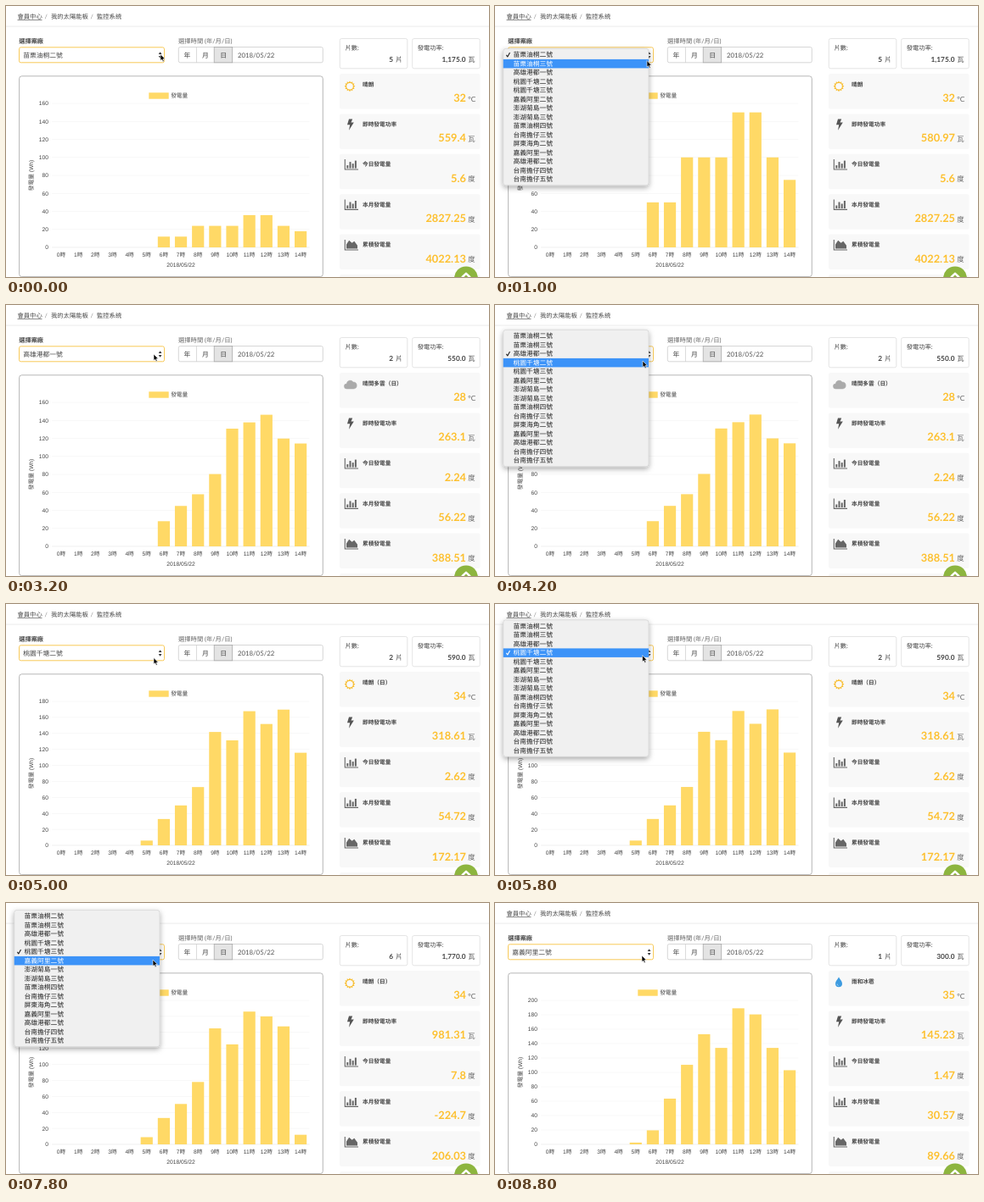
An HTML page for the animation above (9 s loop, 569 px wide and 320 px high).

```html
<!DOCTYPE html>
<html lang="zh-Hant">
<head>
<meta charset="utf-8">
<title>監控系統</title>
<style>
  html, body { margin: 0; width: 100%; height: 100%; overflow: hidden; background: #fff; }
  svg { display: block; width: 100%; height: 100%; text-rendering: geometricPrecision;
        font-family: Lato, "Noto Sans CJK TC", "Noto Sans CJK JP", sans-serif; }
  .axis { font-family: "Liberation Sans", "Noto Sans CJK TC", "Noto Sans CJK JP", sans-serif; }
</style>
</head>
<body>
<svg id="stage" viewBox="0 0 569 320"></svg>
<script>
const LOOP = 9000, STEP = 200, GROW = 500;
const INK = '#444', GOLD = '#fdc02f', BAR = '#ffd966';

const MENU = ['苗栗油桐二號', '苗栗油桐三號', '高雄港都一號', '桃園千塘二號', '桃園千塘三號',
  '嘉義阿里二號', '澎湖菊島一號', '澎湖菊島三號', '苗栗油桐四號', '台南擔仔三號',
  '屏東海角二號', '嘉義阿里一號', '高雄港都二號', '台南擔仔四號', '台南擔仔五號'];
// Rows as listed from the second popup on.
const ROWS = MENU;

// at: selection time, chart: start of bar growth, first: hour of the first bar
const SITES = [
  { at: 0, chart: -33, max: 160, first: 6, bars: [50, 50, 100, 100, 100, 150, 150, 100, 75],
    panels: '5', watts: '1,175.0', sky: '晴朗', icon: 'sun', nums: ['32', '580.97', '5.6', '2827.25', '4022.13'] },
  { at: 1200, chart: 1400, max: 160, first: 6, bars: [47, 58.7, 94, 105.7, 117.5, 117.5, 129.3, 152.7, 117.5],
    panels: '8', watts: '1,880.0', sky: '晴朗', icon: 'sun', nums: ['32', '913.32', '9.44', '396.32', '6572.52'] },
  { at: 2600, chart: 2800, max: 160, first: 6, bars: [28, 45, 58, 80.5, 131, 138, 146.5, 120, 114.5],
    panels: '2', watts: '550.0', sky: '晴間多雲（日）', icon: 'cloud', nums: ['28', '263.1', '2.24', '56.22', '388.51'] },
  { at: 4400, chart: 4600, max: 180, first: 5, bars: [6, 33, 50, 73, 142, 131.5, 168, 152, 170, 116],
    panels: '2', watts: '590.0', sky: '晴朗（日）', icon: 'sun', nums: ['34', '318.61', '2.62', '54.72', '172.17'] },
  { at: 6200, chart: 6400, max: 180, first: 5, bars: [9, 33, 50.5, 78, 145, 125, 166, 160, 147.5, 12],
    panels: '6', watts: '1,770.0', sky: '晴朗（日）', icon: 'sun', nums: ['34', '981.31', '7.8', '-224.7', '206.03'] },
  { at: 8000, chart: 8300, max: 200, first: 5, bars: [2.5, 19.5, 63.5, 110.5, 153, 134, 189, 180.5, 134, 103],
    panels: '1', watts: '300.0', sky: '雨和冰雹', icon: 'drop', nums: ['35', '145.23', '1.47', '30.57', '89.66'] }
];
const POPUPS = [[800, 1200], [2200, 2600], [3800, 4400], [5600, 6200], [7400, 8000]];
// time, x, y of the pointer tip
const PATH = [[0, 182, 57], [600, 181, 58], [800, 180, 60], [1000, 179, 64.5], [1400, 178, 65],
  [2000, 177, 59], [2400, 176.5, 59], [2600, 175, 66], [3200, 174, 58], [3800, 174, 58],
  [4200, 174, 66], [5000, 174, 63.5], [5400, 174, 58], [5700, 174, 58], [6000, 173, 66],
  [6400, 173, 65], [6800, 173, 57.5], [7400, 173, 58], [7800, 173, 67], [8400, 173, 66], [8800, 173, 62]];

const text = (s, x, cy, size, o = {}) =>
  `<text x="${x}" y="${cy + size * .37}" font-size="${size}" fill="${o.fill || INK}" text-anchor="${o.anchor || 'start'}"` +
  ` font-weight="${o.weight || 400}" class="${o.cls || ''}">${s}</text>`;
const rect = (x, y, w, h, fill, o = {}) =>
  `<rect x="${x}" y="${y}" width="${w}" height="${h}" fill="${fill}" rx="${o.r || 0}"` +
  ` stroke="${o.line || 'none'}" stroke-width="${o.lw || .8}"/>`;
const path = (d, fill, o = {}) =>
  `<path d="${d}" fill="${fill}" stroke="${o.line || 'none'}" stroke-width="${o.lw || 1}" stroke-linejoin="round"/>`;

const cardY = i => 80 + i * 47.4;
const colX = h => 65 + h * 20.15;

function weather(kind) {
  if (kind === 'cloud')
    return path('M401.5 99a3 3 0 0 1-.2-6 4.2 4.2 0 0 1 7.7-2 3.6 3.6 0 0 1 .4 8z', '#aaa', { line: '#aaa', lw: .5 });
  if (kind === 'drop')
    return path('M405 87.5c1.8 3.2 4 5 4 7.800a4 4 0 0 1-8 0c0-2.800 2.200-4.600 4-7.800z', '#3d9be0') +
      path('M403 95.500a2 2 0 0 0 1.500 2', 'none', { line: '#bfe2fa', lw: .8 });
  let d = '';
  for (let i = 0; i < 24; i++) {
    const a = i * Math.PI / 12, r = i % 2 ? 4.7 : 6.4;
    d += (i ? 'L' : 'M') + (405 + r * Math.sin(a)).toFixed(2) + ' ' + (94.8 - r * Math.cos(a)).toFixed(2);
  }
  return path(d + 'z', '#f8bd2f') + '<circle cx="405" cy="94.8" r="3.8" fill="#f9f9f9"/>';
}

function barIcon(y) {
  return path(`M399.3 ${y - 6}v12h15.700`, 'none', { line: '#666', lw: 1.1 }) +
    [3.5, 7.5, 5.5, 9].map((h, i) => rect(401.3 + i * 3.2, y + 4.6 - h, 2, h, '#666')).join('');
}

function backdrop() {
  let s = rect(0, 0, 569, 320, '#fff') + rect(0, 23.7, 569, .7, '#e4e4e4');
  s += text('會員中心', 13.5, 12, 7.3) + rect(13.5, 16, 29, .6, INK) + text('/', 45.5, 12, 7.3, { fill: '#888' }) +
    text('我的太陽能板', 53, 12, 7.3) + text('/', 99.500, 12, 7.3, { fill: '#888' }) + text('監控系統', 107, 12, 7.3);
  s += text('選擇案廠', 15.3, 41, 7.2, { weight: 700 }) + text('選擇時間 (年/月/日)', 203, 41, 7.3, { fill: '#666' });

  s += rect(15.5, 48.8, 171, 18, '#fff', { r: 2, line: '#f8c957', lw: 1 });
  s += path('M179.700 57l1.900-2.700 1.900 2.700zM179.700 59l1.900 2.700 1.900-2.700z', '#333');
  s += rect(203.3, 48.5, 170, 18.300, '#fff', { r: 2, line: '#ccc' });
  s += rect(245.2, 48.5, 21.5, 18.300, '#e4e4e4', { line: '#aaa' }) + rect(224, 48.5, .7, 18.300, '#ccc');
  ['年', '月', '日'].forEach((c, i) => s += text(c, 213.5 + i * 21.300, 58, 7.8, { anchor: 'middle' }));
  s += text('2018/05/22', 273, 58, 7.8, { fill: '#555' });

  s += rect(15.6, 82.8, 357.700, 236.800, '#fff', { r: 3, line: '#a5a5a5' });
  s += rect(168.300, 102.300, 23.400, 7.4, BAR) + text('發電量', 194.200, 106, 6.7, { cls: 'axis' });
  for (let h = 0; h < 15; h++) s += text(h + '時', colX(h), 294, 6.7, { anchor: 'middle', cls: 'axis' });
  s += text('2018/05/22', 206, 306, 6.7, { anchor: 'middle', cls: 'axis' });
  s += `<g transform="translate(29.500 200) rotate(-90)">${text('發電量 (Wh)', 0, 0, 6.7, { anchor: 'middle', cls: 'axis' })}</g>`;

  s += rect(393.300, 38.500, 79.500, 35.300, '#fff', { r: 2, line: '#ddd' }) + rect(478.700, 38.500, 79.500, 35.300, '#fff', { r: 2, line: '#ddd' });
  s += text('片數:', 399.500, 49, 7.3) + text('發電功率:', 484.700, 49, 7.3);
  s += text('片', 467, 63, 8, { anchor: 'end', weight: 500 }) + text('瓦', 552.500, 63, 8, { anchor: 'end', weight: 500 });

  const titles = ['', '即時發電功率', '今日發電量', '本月發電量', '累積發電量'];
  const units = ['°C', '瓦', '度', '度', '度'];
  for (let i = 0; i < 6; i++) s += rect(393, cardY(i), 165.500, 41.500, '#f8f8f8', { r: 2 });
  titles.forEach((c, i) => {
    s += text(c, 420, cardY(i) + 12.2, 6.7, { weight: 700 });
    s += text(units[i], 544.300, cardY(i) + 29.500, 8.400, { fill: '#666' });
  });
  s += path('M404 133.500h4.200l-1.700 4h3.300l-5.800 9.300 1.200-6.600h-3.200z', '#555');
  s += barIcon(187) + barIcon(234.400);
  s += path('M399.300 276v12h15.700', 'none', { line: '#666', lw: 1.1 }) +
    path('M401 286.500v-5l3.200-4.700 3.400 3 2.700-2 3.700 5v3.700z', '#666');
  return s + '<circle cx="542" cy="321.500" r="14" fill="#8db53f"/>' +
    path('M537.200 320.500l4.800-4.600 4.800 4.600', 'none', { line: '#fff', lw: 2.5 });
}

function chart(site, grown) {
  let s = '';
  for (let v = 0; v <= site.max; v += 20) {
    const y = 285 - 170 * v / site.max;
    s += rect(54, y - .25, 303.500, .5, v ? '#f1f1f1' : '#ddd') + text(v, 50, y, 6.7, { anchor: 'end', cls: 'axis' });
  }
  site.bars.forEach((v, i) => {
    const h = 170 * v / site.max * grown;
    s += rect(colX(site.first + i) - 7.100, 285 - h, 14.200, h, BAR);
  });
  return s;
}

function popup(checked, tipY) {
  const pitch = 10.5, top = 50.300 - checked * pitch;
  const hot = Math.floor((tipY - top - 2) / pitch);
  let s = `<g filter="url(#shade)">${rect(9.700, top, 171.300, 161.500, '#f0f0f0', { r: 3, line: '#c4c4c4', lw: .5 })}</g>`;
  ROWS.forEach((name, i) => {
    const y = top + 7.300 + i * pitch, fill = i === hot ? '#fff' : '#222';
    if (i === hot) s += rect(9.700, y - 5.200, 171.300, pitch, '#3c93f8');
    if (i === checked) s += path(`M13.300 ${y + .3}l1.500 2 2.700-5`, 'none', { line: fill, lw: 1.1 });
    s += text(name, 21.500, y, 7.750, { fill });
  });
  return s;
}

function pointer(t) {
  const k = PATH.findIndex(p => p[0] > t);
  if (k < 0) return PATH[PATH.length - 1].slice(1);
  const a = PATH[k - 1], b = PATH[k], u = (t - a[0]) / (b[0] - a[0]);
  return [a[1] + (b[1] - a[1]) * u, a[2] + (b[2] - a[2]) * u];
}

function scene(t) {
  const site = SITES.filter(c => c.at <= t).pop();
  const plotted = SITES.filter(c => c.chart <= t).pop();
  const u = Math.min(1, (t - plotted.chart) / GROW);
  const [px, py] = pointer(t);
  const open = POPUPS.findIndex(([a, b]) => t >= a && t < b);

  let s = chart(plotted, 1 - (1 - u) ** 4);
  s += text(MENU[SITES.indexOf(site)], 20.300, 58, 7.750);
  s += text(site.panels, 456, 63, 8.300, { anchor: 'end', weight: 700 });
  s += text(site.watts, 541.500, 63, 8.300, { anchor: 'end', weight: 700 });
  s += weather(site.icon) + text(site.sky, 420, 92.200, 6.7, { weight: 700 });
  site.nums.forEach((n, i) => {
    const shown = i === 1 && t < 400 ? '559.4' : n;
    s += text(shown, 542, cardY(i) + 28.300, 12.800, { anchor: 'end', weight: 700, fill: GOLD });
  });
  if (open >= 0) s += popup(open, py);
  return s + `<g transform="translate(${px} ${py})">` +
    path('M0 0v7.600l1.700-1.500 1.200 2.700 1.300-.6-1.200-2.600h2.400z', '#000', { line: '#fff', lw: .6 }) + '</g>';
}

const stage = document.getElementById('stage');
stage.innerHTML = '<defs><filter id="shade" x="-10%" y="-10%" width="120%" height="125%">' +
  '<feDropShadow dx="0" dy="2.500" stdDeviation="3" flood-opacity=".35"/></filter></defs>' +
  backdrop() + '<g id="live"></g>';
const live = document.getElementById('live');
const start = performance.now();
let last = -1;

function draw() {
  const t = Math.floor((performance.now() - start) % LOOP / STEP) * STEP;
  if (t !== last) live.innerHTML = scene(last = t);
  requestAnimationFrame(draw);
}
draw();
</script>
</body>
</html>
```
